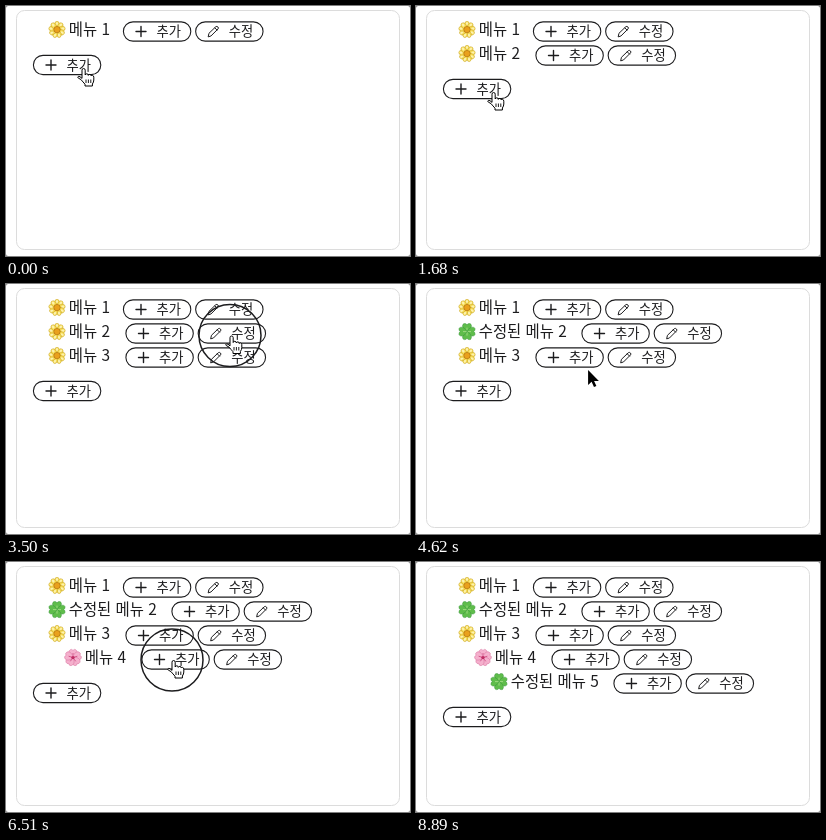
An HTML page for the animation above (9.38 s loop, 404 by 250 pixels).

```html
<!DOCTYPE html>
<html lang="ko">
<head>
<meta charset="utf-8">
<title>메뉴</title>
<style>
html, body { margin: 0; width: 100%; height: 100%; overflow: hidden; background: #888; }
svg { display: block; width: 404px; height: 250px; font-family: "Noto Sans CJK KR", "Noto Sans CJK", sans-serif; fill: #1c1c1e; }
.line { fill: none; stroke: #1c1c1e; stroke-linecap: round; stroke-linejoin: round; }
</style>
</head>
<body>
<svg id="stage" viewBox="0 0 404 250"></svg>
<script>
const LOOP = 9380, STEP = 70;
const stage = document.getElementById('stage');

// depth, number, time of appearance, time of edit, first icon
const rows = [
  [0, 1, 0, LOOP, 'daisy'],
  [0, 2, 980, 3640, 'daisy'],
  [0, 3, 2240, LOOP, 'daisy'],
  [1, 4, 5250, LOOP, 'cherry'],
  [2, 5, 6650, 7910, 'cherry']
];

// click rings: on, off
const clicks = [[840, 980], [2170, 2240], [3500, 3640], [5180, 5320], [6510, 6650], [7770, 7910]];

// pointer moves: start and end time, start point, control point, end point
const moves = [
  [0, 700, 76, 62, 76, 120, 70, 63],
  [1190, 1680, 70, 63, 84, 75, 76, 86],
  [2380, 3080, 76, 86, 150, 50, 224, 51.5],
  [3640, 4900, 224, 51.5, 182.5, 109.6, 168, 80],
  [5390, 6230, 168, 80, 168, 90, 166, 98],
  [6720, 7700, 166, 98, 205, 104, 253.5, 121],
  [8050, 8890, 253.5, 121, 290, 150, 232, 254]
];

const at = (x, y, body) => `<g transform="translate(${x} ${y})">${body}</g>`;
const path = (d, attrs = 'class="line"') => `<path d="${d}" ${attrs}/>`;
const text = (x, y, size, s) => `<text x="${x}" y="${y}" font-size="${size}">${s}</text>`;
const ring = (n, shape) => Array.from({ length: n }, (_, i) =>
  `<g transform="rotate(${i * 360 / n})">${shape}</g>`).join('');

const icons = {
  daisy:
    ring(9, '<ellipse cy="-5" rx="2.4" ry="3.3" fill="#f7dc55" stroke="#c8a52c" stroke-width=".5"/>' +
      '<ellipse cy="-6" rx="1.1" ry="1.6" fill="#fdf2ae"/>') +
    '<circle r="3.2" fill="#e9a11d" stroke="#a9690f" stroke-width=".6"/>',
  clover:
    path('M0 0Q1 5 3.5 7.8', 'fill="none" stroke="#4d9a3c" stroke-width="1.4"') +
    ring(4, path('M0 0C-6 -3 -5 -8.4 -2.2 -8Q-.6 -8 0 -6.6Q.6 -8 2.2 -8C5 -8.4 6 -3 0 0Z',
      'fill="#5fbd4b" stroke="#36923a" stroke-width=".5"') +
      path('M0 -.5V-4', 'stroke="#a5dd87" stroke-width=".9"')),
  cherry:
    ring(5, path('M0 0C-6 -3 -4.6 -8.2 -1.4 -8.2L0 -7.2L1.4 -8.2C4.6 -8.2 6 -3 0 0Z',
      'fill="#f5b0cd" stroke="#dc7ba6" stroke-width=".6"') +
      path('M0 -1V-4.6', 'stroke="#c93d78" stroke-width=".7"')) +
    '<circle r="1.7" fill="#c02c63"/>'
};

const plus = path('M-5 0H5M0 -5V5', 'class="line" stroke-width="1.4"');
const pen = path('M-5 5L-4.3 1.8L2.6 -4.8Q3.6 -5.6 4.7 -4.5Q5.6 -3.5 4.8 -2.6L-2 4.2ZM1.6 -3.6L3.8 -1.4');
const outlined = 'fill="#fff" stroke="#000" stroke-linejoin="round"';
const hand =
  path('M0 10.4V2.2Q0 .5 1.6 .5Q3.2 .5 3.2 2.2V7Q3.4 5.8 4.8 5.8Q6.2 5.8 6.3 7.4Q6.6 6.4 7.9 6.4' +
    'Q9.2 6.5 9.3 8Q9.6 7.2 10.5 7.4Q11.8 7.6 11.8 9.2V12Q11.8 14 10.4 16V18H3V16.2' +
    'Q1 14 -1 11.6L-3.8 10Q-4.8 9.2 -3.6 8.4Q-2.2 8 0 10.4Z', outlined) +
  path('M4 11.5V15M6.4 11.5V15M8.8 11.5V15', 'stroke="#000" stroke-width=".9"');
const arrow = path('M0 0V15L3.5 11.8L5.9 17L8.3 16L6 11H10.8Z',
  'stroke="#fff" stroke-width="1.4" paint-order="stroke" fill="#000"');

function pointer(t) {
  const [t0, t1, x0, y0, cx, cy, x1, y1] = moves.findLast(m => m[0] <= t);
  const p = Math.min(1, (t - t0) / (t1 - t0)), u = p * p * (3 - 2 * p), v = 1 - u;
  const mix = (a, b, c) => a * v * v + 2 * b * u * v + c * u * u;
  return [mix(x0, cx, x1), mix(y0, cy, y1)];
}

function draw(t) {
  const [px, py] = pointer(t);
  let over = false;

  const button = (x, y, icon, label) => {
    over ||= px >= x && px <= x + 68 && py >= y && py <= y + 20;
    return at(x, y,
      '<rect x=".4" y=".4" width="67.4" height="19.2" rx="9.6" class="line" stroke-width="1.1"/>' +
      at(18, 10, icon) + text(33.5, 14.7, 13.3, label));
  };

  const shown = rows.filter(r => r[2] <= t);
  let out = '<rect width="404" height="250" rx="2.5" fill="#fff"/>' +
    '<rect x="10.5" y="4.5" width="383" height="239" rx="8" fill="none" stroke="#dcdcdc"/>';

  shown.forEach(([depth, n, , edit, icon], i) => {
    const x = 42 + 16 * depth, y = 24 * i, edited = t >= edit;
    const bx = x + (n === 1 ? 75 : 77.5) + (edited ? 46 : 0);
    out += at(x + 9, y + 23.6, icons[edited ? 'clover' : icon]) +
      text(x + 20.7, y + 29.2, 15.45, `${edited ? '수정된 ' : ''}메뉴 ${n}`) +
      button(bx, y + 15.5, plus, '추가') +
      button(bx + 72.25, y + 15.5, pen, '수정');
  });
  out += button(27, 25 + 24 * shown.length, plus, '추가');

  if (clicks.some(([on, off]) => t >= on && t < off))
    out += `<circle cx="${px}" cy="${py}" r="31" class="line" stroke-width="1.5"/>`;
  if (t < 8890) out += at(px, py, over ? hand : arrow);
  stage.innerHTML = out;
}

let last = -1;
function tick() {
  const t = Math.floor(performance.now() % LOOP / STEP) * STEP;
  if (t !== last) draw(last = t);
  requestAnimationFrame(tick);
}
tick();
</script>
</body>
</html>
```
